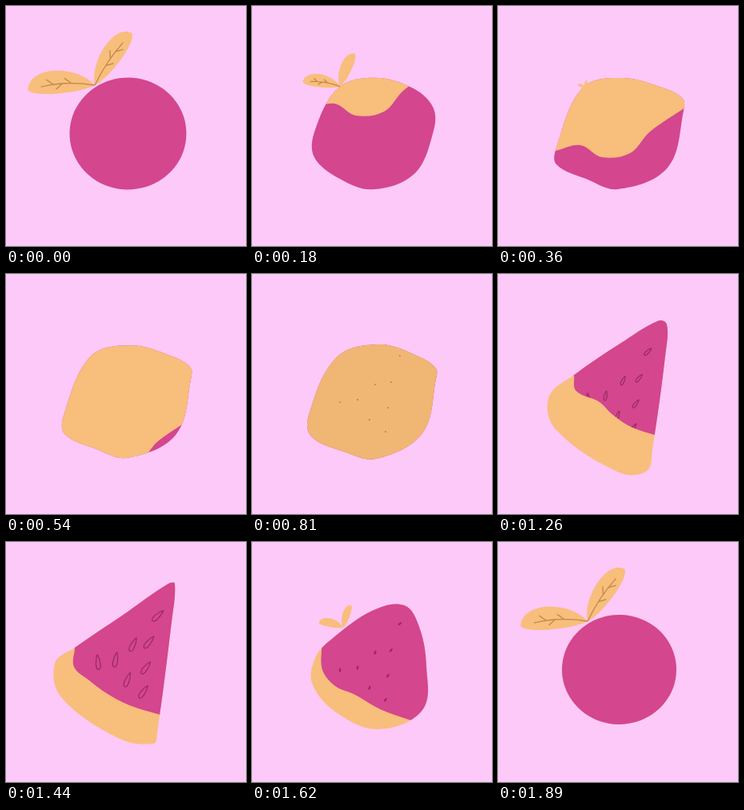
An HTML page with a canvas that plays this animation: 300 px wide and 300 px high, repeating every 1980 ms.

```html
<!DOCTYPE html>
<html lang="en">
<head>
<meta charset="utf-8">
<title>Fruit morph</title>
<style>
  html, body { margin: 0; width: 100%; height: 100%; overflow: hidden; background: #fdc9f8; }
  canvas { display: block; width: 100vw; height: 100vh; }
</style>
</head>
<body>
<canvas id="stage" width="300" height="300"></canvas>
<script>
const ctx = document.getElementById('stage').getContext('2d');
const STEP = 90, COUNT = 22;
const BG = '#fdc9f8', PINK = '#d4468e', SEED = '#962a62', VEIN = '#c48a4a';

// Outlines: ten points, clockwise from the leaf joint.
function round(cx, cy, rx, ry) {
  const pts = [];
  for (let i = 0; i < 10; i++) {
    const a = (-125 + 36 * i) * Math.PI / 180;
    pts.push(cx + rx * Math.cos(a), cy + ry * Math.sin(a));
  }
  return pts;
}
const shift = (pts, dx, dy) => pts.map((v, i) => v + (i % 2 ? dy : dx));

const lemon = [106,102, 155,90, 208,103, 231,116, 232,131, 212,202, 150,229, 110,216, 73,198, 73,177];
const blob = [106,104, 160,88, 208,103, 230,118, 230,131, 213,199, 155,231, 115,222, 74,203, 71,176];
const wedge = [106,119, 160,82, 198,65, 211,74, 212,98, 197,200, 187,241, 160,250, 75,194, 66,156];
const slice = [86,132, 145,92, 203,52, 211,52, 207,100, 189,238, 184,252, 140,245, 69,194, 61,152];
const berry = [100,121, 150,86, 190,79, 209,106, 218,155, 213,210, 157,234, 104,212, 75,176, 80,143];

// Lines between the two colours.
const pour = [72,181, 103,174, 130,189, 165,184, 190,157, 234,127];
const wedgeCut = [104,121, 110,136, 148,146, 163,164, 180,179, 201,187];
const sliceCut = [86,133, 85,156, 104,173, 124,188, 154,204, 193,216];
const berryCut = [87,130, 88,160, 104,180, 129,191, 160,209, 199,223];

// Tracks hold [step, values].
const body = [
  [0, round(152.5, 159.5, 73, 70)], [4, lemon], [9, blob], [12, wedge],
  [16, slice], [18, berry], [20, round(151.5, 159.5, 71.5, 68.5)]
];
const pouring = [[0, shift(pour, 0, -104)], [8, shift(pour, 0, 104)]];
const cutting = [
  [9, shift(wedgeCut, 0, -102)], [12, wedgeCut], [16, sliceCut],
  [18, berryCut], [20, shift(berryCut, -30, 45)]
];
// joint and leaf scale
const sprig = [[0, [111, 99, 1]], [4, [109, 102, .12]], [5, [109, 101, 0]],
  [16, [114, 110, 0]], [18, [114, 107, .37]], [21, [112, 99, 1]]];
// seed size and how far seeds sit from their place in the slice
const growth = [[6, [0, 1]], [8, [.03, 1]], [10, [.03, 1]], [12, [.32, 1]],
  [16, [1, 0]], [18, [.23, 1]], [20, [0, 1]]];
const seeds = [[190,92], [179,125], [159,128], [175,157], [137,147], [115,150], [152,172], [172,187]];

function sample(track, n) {
  const next = track.findIndex(key => key[0] > n);
  if (next === 0) return track[0][1];
  if (next < 0) return track[track.length - 1][1];
  const [t0, a] = track[next - 1], [t1, b] = track[next];
  const k = (n - t0) / (t1 - t0);
  return a.map((v, i) => v + (b[i] - v) * k);
}

// Smooth curve through points; handles follow each segment's length.
function curve(path, v, closed) {
  const n = v.length / 2;
  const at = i => {
    const j = closed ? (i + n) % n : Math.max(0, Math.min(n - 1, i));
    return [v[2 * j], v[2 * j + 1]];
  };
  const dir = i => {
    const a = at(i - 1), b = at(i + 1);
    const dx = b[0] - a[0], dy = b[1] - a[1], d = Math.hypot(dx, dy) || 1;
    return [dx / d, dy / d];
  };
  path.moveTo(...at(0));
  for (let i = 0; i < (closed ? n : n - 1); i++) {
    const p = at(i), q = at(i + 1), u = dir(i), w = dir(i + 1);
    const h = Math.hypot(q[0] - p[0], q[1] - p[1]) * .34;
    path.bezierCurveTo(p[0] + u[0] * h, p[1] + u[1] * h,
      q[0] - w[0] * h, q[1] - w[1] * h, q[0], q[1]);
  }
}

// A leaf along the x axis; wide and thin are the bulges of its two sides.
function leaf(x, y, angle, len, wide, thin, fill) {
  ctx.save();
  ctx.translate(x, y);
  ctx.rotate(angle * Math.PI / 180);
  ctx.fillStyle = fill;
  ctx.beginPath();
  ctx.moveTo(0, 0);
  ctx.bezierCurveTo(len * .25, wide * 1.3, len * .95, wide * 1.45, len, 0);
  ctx.bezierCurveTo(len * .95, thin * 1.45, len * .25, thin * 1.3, 0, 0);
  ctx.fill();
  if (len > 45) veins(len, (wide + thin) * .6);
  ctx.restore();
}

function veins(len, bend) {
  ctx.strokeStyle = VEIN;
  ctx.lineWidth = 1.4;
  ctx.beginPath();
  ctx.moveTo(0, 0);
  ctx.quadraticCurveTo(len * .42, bend, len * .8, bend * .3);
  for (let i = 0; i < 3; i++) {
    const t = .42 + .17 * i, s = 2 * t * (1 - t);
    const x = len * (s * .42 + t * t * .8), y = bend * (s + t * t * .3);
    ctx.moveTo(x, y);
    ctx.lineTo(x + len * .1, y + (i % 2 ? -1 : 1) * len * .08);
  }
  ctx.stroke();
}

// Leaves stand closer together while they are small.
function drawLeaves(n, fill) {
  const [x, y, s] = sample(sprig, n), fold = 25 * (1 - s);
  if (!s) return;
  leaf(x, y, 176 + fold, 84 * s, 21 * s, -7 * s, fill);
  leaf(x, y, -55 - fold, 80 * s, -17 * s, 8 * s, fill);
}

function drawSeeds(n) {
  const [size, off] = sample(growth, n);
  if (!size) return;
  const h = 9.5 * size, w = 3.2 * size;
  ctx.strokeStyle = SEED;
  ctx.lineWidth = 1.2;
  for (const [x, y] of seeds) {
    ctx.save();
    ctx.translate(x - 5 * off, y + 10 * off);
    ctx.rotate((-95 + (x - 115) * .7) * Math.PI / 180);
    ctx.beginPath();
    ctx.moveTo(h, 0);
    ctx.bezierCurveTo(h * .3, w, -h, w * 1.3, -h, 0);
    ctx.bezierCurveTo(-h, -w * 1.3, h * .3, -w, h, 0);
    ctx.stroke();
    ctx.restore();
  }
}

function draw(n) {
  const ripe = Math.max(0, 1 - Math.abs(n - 9) / 3);
  const peel = `rgb(${248 - 8 * ripe}, ${190 - 8 * ripe}, ${124 - 8 * ripe})`;
  const early = n < 10;
  const edge = sample(early ? pouring : cutting, n);

  ctx.fillStyle = BG;
  ctx.fillRect(0, 0, 300, 300);

  const shape = new Path2D();
  curve(shape, sample(body, n), true);
  const top = new Path2D();
  curve(top, edge, false);
  top.lineTo(300, edge[edge.length - 1]);
  top.lineTo(300, 0);
  top.lineTo(0, 0);
  top.closePath();

  ctx.fillStyle = early ? PINK : peel;
  ctx.fill(shape);
  ctx.save();
  ctx.clip(shape);
  ctx.clip(top);
  ctx.fillStyle = early ? peel : PINK;
  ctx.fillRect(0, 0, 300, 300);
  drawSeeds(n);
  ctx.restore();

  drawLeaves(n, peel);
}

function tick() {
  draw(Math.floor(performance.now() / STEP) % COUNT);
  requestAnimationFrame(tick);
}
tick();
</script>
</body>
</html>
```
